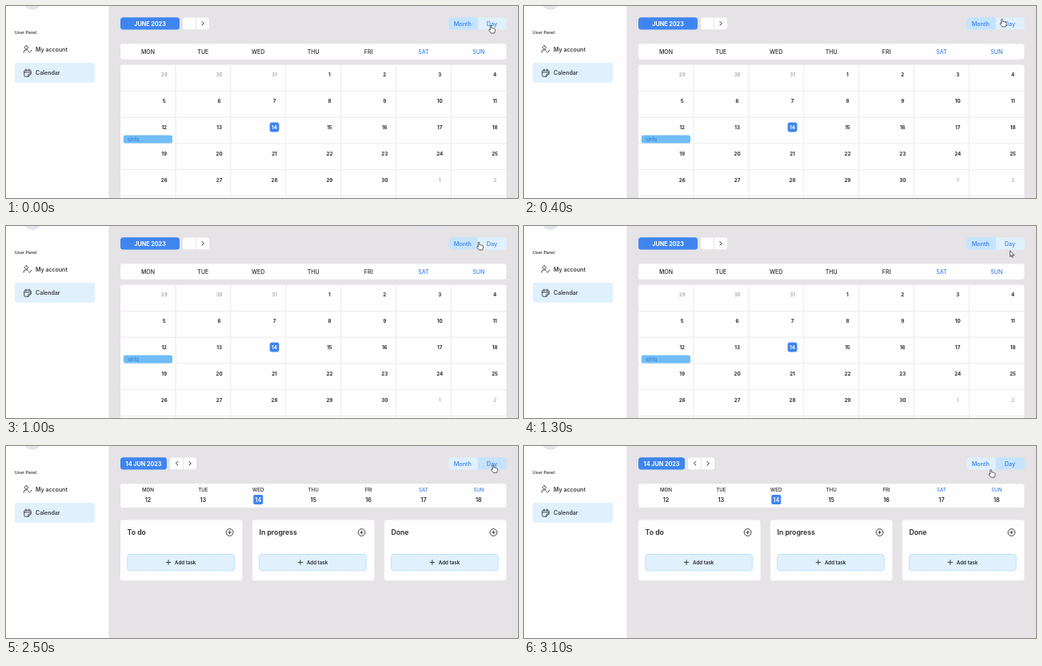
Recreate the animation shown at these times as an HTML page with a canvas. Size 640x240 px, loop 3200 ms.

```html
<!DOCTYPE html>
<html lang="en">
<head>
<meta charset="utf-8">
<title>Calendar views</title>
<style>
html, body { margin: 0; width: 100%; height: 100%; overflow: hidden; background: #e5e3e5; }
canvas { display: block; width: 640px; height: 240px; }
</style>
</head>
<body>
<canvas id="stage"></canvas>
<script>
const canvas = document.getElementById('stage');
const ctx = canvas.getContext('2d');
const ratio = window.devicePixelRatio || 1;
canvas.width = 640 * ratio;
canvas.height = 240 * ratio;

const LOOP = 3200, STEP = 100, DAY_VIEW_AT = 2500;
const BLUE = '#3f85ef', LINK = '#3c82ec', PALE = '#e0f1fd', ACTIVE = '#c5e3fd';
const INK = '#2b2b30', MUTED = '#9b9b9e', LINE = '#e8e7e8', BG = '#e5e3e5', WHITE = '#fefefe';
const DAYS = ['MON', 'TUE', 'WED', 'THU', 'FRI', 'SAT', 'SUN'];
const LEFT = 143, WIDTH = 482.3, COL = WIDTH / 7, ROW = 32.8, GRID_TOP = 73.5;

// time, x, y of the pointer tip
const PATH = [
  [0, 606, 24], [400, 597.5, 16], [1000, 591, 20], [1300, 607.5, 31.2],
  [1700, 609, 23.5], [2900, 609, 23.5], [3100, 583.5, 29.3], [LOOP, 583.5, 29.3]
];

const hand = new Path2D('M1.6 5.6V1.1Q1.6 .2 2.4 .2T3.2 1.1V3.6Q4.2 3.1 4.8 3.9Q5.8 3.5 6.3 4.3Q7.6 4 7.8 5.2V7.2L7 9.9H2.7L.2 6.8Q-.3 5.9 .5 5.4Q1 5.1 1.6 5.6Z');
const arrow = new Path2D('M0 0V7L1.6 5.6L2.7 8L3.8 7.5L2.7 5.2H4.9Z');
const userIcon = new Path2D('M-1.6 -4.3a2.1 2.1 0 1 0 .01 0M-4.8 4.2V3Q-4.6 1 -2.4 1H.4M1 2.8L2.5 4.2L5 1.2');
const calendarIcon = new Path2D('M.8 4.2H-2.8Q-4.2 4.2 -4.2 2.8V-2.4Q-4.2 -3.8 -2.8 -3.8H2.8Q4.2 -3.8 4.2 -2.4V1L.8 4.2V2Q.8 1 1.8 1H4.2M-4.2 -1.2H4.2M-2 -5V-2.8M2 -5V-2.8');

function box(x, y, w, h, r, fill, stroke) {
  ctx.beginPath();
  ctx.roundRect(x, y, w, h, r);
  ctx.fillStyle = fill;
  ctx.fill();
  if (stroke) {
    ctx.strokeStyle = stroke;
    ctx.lineWidth = 0.7;
    ctx.stroke();
  }
}

function text(str, x, y, size, weight, color, align = 'center') {
  ctx.font = `${weight} ${size}px Inter, sans-serif`;
  ctx.textAlign = align;
  ctx.textBaseline = 'alphabetic';
  ctx.fillStyle = color;
  ctx.fillText(str, x, y + size * 0.36);
}

function line(color, width, ...points) {
  ctx.beginPath();
  points.forEach(([x, y], i) => i ? ctx.lineTo(x, y) : ctx.moveTo(x, y));
  ctx.strokeStyle = color;
  ctx.lineWidth = width;
  ctx.stroke();
}

function icon(path, x, y, width, fill) {
  ctx.save();
  ctx.translate(x, y);
  ctx.lineJoin = ctx.lineCap = 'round';
  if (fill) {
    ctx.fillStyle = fill;
    ctx.fill(path);
  }
  ctx.strokeStyle = '#35353a';
  ctx.lineWidth = width;
  ctx.stroke(path);
  ctx.restore();
}

function plus(x, y, r) {
  line(INK, 0.9, [x - r, y], [x + r, y]);
  line(INK, 0.9, [x, y - r], [x, y + r]);
}

function chevron(x, dir) {
  line(INK, 1, [x - 1.3 * dir, 19.2], [x + 1.3 * dir, 21.8], [x - 1.3 * dir, 24.4]);
}

function sidebar() {
  box(0, 0, 128.5, 240, 0, WHITE);
  ctx.beginPath();
  ctx.arc(33, -6, 11, 0, Math.PI * 2);
  ctx.fillStyle = '#e3e7ed';
  ctx.fill();
  text('User Panel', 10.8, 33, 5.4, 500, INK, 'left');
  box(11, 70.8, 100, 25, 3, PALE);
  icon(userIcon, 27, 54, 0.9);
  icon(calendarIcon, 27, 84, 0.9);
  text('My account', 37, 54, 7, 600, '#3c3c42', 'left');
  text('Calendar', 37, 83.5, 7, 600, '#3c3c42', 'left');
}

function toolbar(title, titleWidth, dayView) {
  box(505, -8, 51, 8.6, 3, '#d5eafa');
  box(LEFT, 14.2, titleWidth, 15.2, 3.5, BLUE);
  text(title, LEFT + titleWidth / 2, 22, 7.2, 700, '#fff');

  const nav = LEFT + titleWidth + 4;
  box(nav, 14.4, 33, 14.8, 3, WHITE);
  line(BG, 0.8, [nav + 16.5, 14.4], [nav + 16.5, 29.2]);
  if (dayView) chevron(nav + 8.7, -1);
  chevron(nav + 24.9, 1);

  box(553.3, 14.2, 36.7, 15.2, [3.5, 0, 0, 3.5], dayView ? PALE : ACTIVE);
  box(589.7, 14.2, 36, 15.2, [0, 3.5, 3.5, 0], dayView ? ACTIVE : PALE);
  text('Month', 570.8, 22, 7.3, 500, LINK);
  text('Day', 607.5, 22, 7.3, 500, LINK);
}

function monthView() {
  toolbar('JUNE 2023', 74, false);
  box(LEFT, 47.2, WIDTH, 19.6, 3, WHITE);
  box(LEFT, GRID_TOP, WIDTH, 180, 3, WHITE);
  for (let i = 1; i < 7; i++) {
    const x = LEFT + COL * i;
    line(LINE, 0.8, [x, GRID_TOP], [x, 240]);
  }
  for (let r = 1; r < 6; r++) {
    const y = GRID_TOP + ROW * r;
    line(LINE, 0.8, [LEFT, y], [LEFT + WIDTH, y]);
  }
  DAYS.forEach((day, i) => text(day, LEFT + COL * (i + 0.5), 57.4, 7, 500, i > 4 ? LINK : INK));

  for (let n = 0; n < 35; n++) {
    const x = LEFT + COL * (n % 7) + 54.7;
    const y = 86.2 + ROW * Math.floor(n / 7);
    const date = n - 2;
    const inMonth = date > 0 && date < 31;
    const label = date < 1 ? date + 31 : date > 30 ? date - 30 : date;
    const today = date === 14;
    if (today) box(x - 5.9, y - 6.2, 11.8, 12, 3, BLUE);
    text(label, x, y, 6.2, inMonth ? 700 : 500, today ? '#fff' : inMonth ? INK : MUTED);
  }
  box(146.8, 161.4, 61.2, 10.2, 2.5, '#70bdf7');
  text('sjhfq', 152, 166.4, 6, 400, '#2d78d2', 'left');
}

function dayView() {
  toolbar('14 JUN 2023', 58, true);
  box(LEFT, 47.2, WIDTH, 29.8, 3, WHITE);
  DAYS.forEach((day, i) => {
    const x = LEFT + COL * (i + 0.5);
    const today = i === 2;
    text(day, x, 55.2, 6.2, 500, i > 4 ? LINK : INK);
    if (today) box(x - 6, 61, 12, 12, 2, BLUE);
    text(12 + i, x, 67.1, 7.2, 600, today ? '#fff' : INK);
  });
  ['To do', 'In progress', 'Done'].forEach((title, i) => {
    const x = LEFT + 164.9 * i;
    box(x, 92.4, 152.5, 75.8, 3, WHITE);
    text(title, x + 8.6, 108, 8.7, 600, INK, 'left');
    ctx.beginPath();
    ctx.arc(x + 136.6, 108, 4.4, 0, Math.PI * 2);
    ctx.strokeStyle = INK;
    ctx.lineWidth = 0.9;
    ctx.stroke();
    plus(x + 136.6, 108, 2.2);
    ctx.setLineDash([2, 1]);
    box(x + 8.8, 135.3, 133.6, 20.5, 3, PALE, '#8cc8f2');
    ctx.setLineDash([]);
    plus(x + 60, 145.4, 3.1);
    text('Add task', x + 68, 145.4, 6.2, 600, INK, 'left');
  });
}

function pointer(time) {
  const i = PATH.findIndex(key => key[0] > time);
  const [t0, x0, y0] = PATH[i - 1], [t1, x1, y1] = PATH[i];
  const k = (time - t0) / (t1 - t0);
  const x = x0 + (x1 - x0) * k, y = y0 + (y1 - y0) * k;
  const outside = y > 29.6;
  icon(outside ? arrow : hand, outside ? x : x - 2.4, y, 0.8, '#fff');
}

function frame(now) {
  const time = Math.floor((now % LOOP) / STEP) * STEP;
  ctx.setTransform(ratio, 0, 0, ratio, 0, 0);
  box(0, 0, 640, 240, 0, BG);
  sidebar();
  if (time < DAY_VIEW_AT) monthView();
  else dayView();
  pointer(time);
}

let start;
function tick(now) {
  start ??= now;
  frame(now - start);
  requestAnimationFrame(tick);
}
frame(0);
requestAnimationFrame(tick);
</script>
</body>
</html>
```
